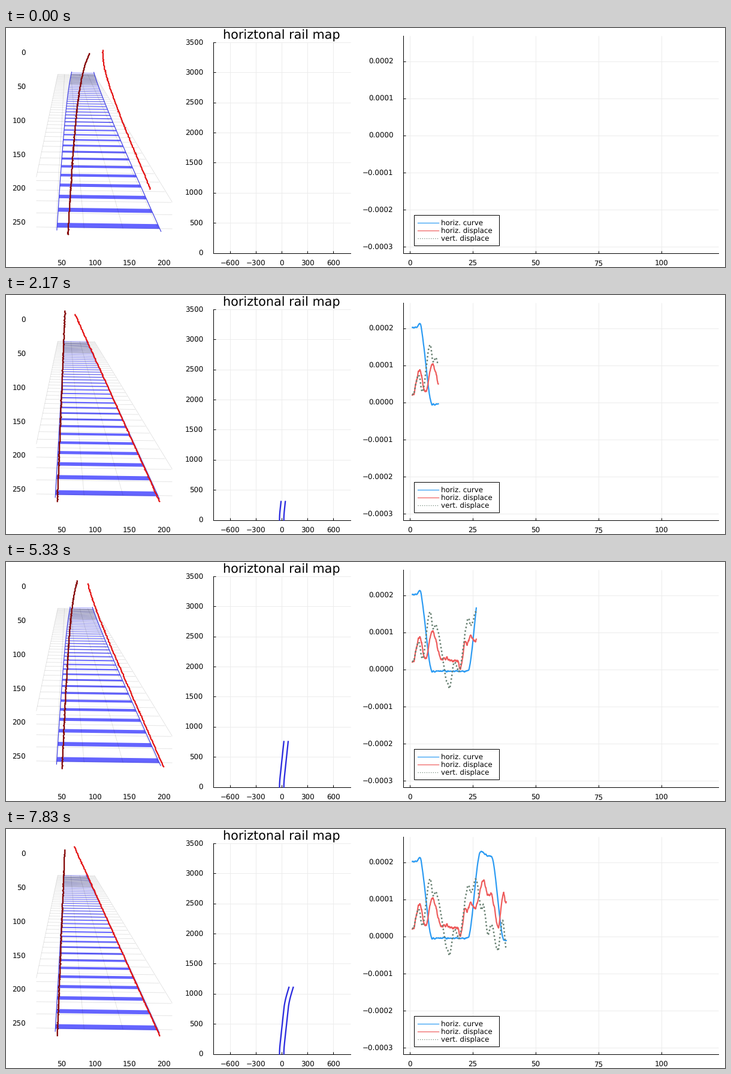
A matplotlib script for the animation above (8000 ms loop, 1200x400 px).

```python
import numpy as np
import matplotlib.pyplot as plt
from matplotlib.animation import FuncAnimation
from matplotlib.collections import LineCollection, PolyCollection
from matplotlib.patches import Rectangle

LOOP = 8000        # ms
TICK = 50          # ms per drawn frame
STEPS = 48         # visible picture changes in one loop
PX = 0.72          # points per pixel at 100 dpi
CELL = 1.137       # size of one camera pixel on the stage

plt.rcParams["text.hinting"] = "none"
fig = plt.figure(figsize=(12, 4), dpi=100, facecolor="white")
ax = fig.add_axes([0, 0, 1, 1])
ax.set_xlim(-0.5, 1199.5)
ax.set_ylim(399.5, -0.5)
ax.axis("off")


def line(xs, ys, color, width=1.0, z=2, **kw):
    return ax.plot(xs, ys, color=color, lw=width * PX, zorder=z, **kw)[0]


def strokes(segments, color, width=1.0, z=2):
    return ax.add_collection(LineCollection(
        segments, colors=[color], linewidths=width * PX, zorder=z))


def label(x, y, text, ha="center", size=11.9):
    ax.text(x, y, text, ha=ha, va="baseline", fontsize=size * PX,
            family="DejaVu Sans", color="black", zorder=10)


def panel(left, top, right, bottom, xticks, yticks, label_x):
    """Axes with grid, inward ticks and labels; ticks are (position, text)."""
    grid, marks = [], []
    for x, text in xticks:
        grid.append([(x, top), (x, bottom)])
        marks.append([(x, bottom), (x, bottom - 4)])
        label(x, 397, text)
    for y, text in yticks:
        grid.append([(left, y), (right, y)])
        marks.append([(left, y), (left + 4, y)])
        label(label_x, y + 4.5, text, ha="right")
    strokes(grid, "#ececec", z=1)
    strokes(marks, "black")
    line([left, left, right], [top, bottom, bottom], "black")


def signed(value, fmt):
    return format(value, fmt).replace("-", "\u2212")


def smooth(t, start, end):
    u = np.clip((t - start) / (end - start), 0, 1)
    return u * u * (3 - 2 * u)


def through(turns, t):
    """Eased curve through (t, value) turning points."""
    total = turns[0][1]
    for (t0, v0), (t1, v1) in zip(turns, turns[1:]):
        total = total + (v1 - v0) * smooth(t, t0, t1)
    return total


def chart_x(v):
    return 673.5 + 4.2 * v


def chart_y(v):
    """Stage height of a value given in 1e-4."""
    return 179.3 - 62.07 * v


# Labels, panels and legend
for v in range(0, 251, 50):
    label(32.5, 45.3 + CELL * v, str(v), ha="right")
for v in range(50, 201, 50):
    label(35.2 + CELL * v, 397, str(v))

panel(345.5, 23.5, 574, 376,
      [(459.75 + 0.143 * v, signed(v, "d")) for v in range(-600, 601, 300)],
      [(376 - 0.10071 * v, str(v)) for v in range(0, 3501, 500)], 328.5)
label(459.5, 18, "horiztonal rail map", size=20.8)

panel(662.5, 12, 1188, 376,
      [(chart_x(v), str(v)) for v in range(0, 101, 25)],
      [(chart_y(k), signed(k / 1e4, ".4f")) for k in range(-3, 3)], 646)

BLUE, RED, GREEN = "#2b9bf3", "#ee5c5c", "#667f70"
ax.add_patch(Rectangle((680.5, 312), 142, 51.5, fc="white", ec="black",
                       lw=PX, zorder=8))
legend = [(BLUE, "horiz. curve", "-"), (RED, "horiz. displace", "-"),
          (GREEN, "vert. displace", (0, (1, 2)))]
for k, (color, text, style) in enumerate(legend):
    y = 325 + 13.25 * k
    line([686, 721], [y, y], color, 1.2, z=9, ls=style)
    label(726, y + 4, text, ha="left")

# Ground grid in perspective
ground = []
for k in range(45):
    y = 1 + 1 / (0.003012 + 0.00023 * k)
    ends = max(50, 101.5 - 0.208 * (y - 2)), min(277, 101.5 + 0.607 * (y - 2))
    ground.append([(x, y + 0.0135 * (x - 90)) for x in ends])
for slope in (-0.208, -0.057, 0.085, 0.28, 0.456, 0.607):
    ys = np.linspace(77, 335, 400)
    xs = 101.5 + slope * (ys - 2)
    keep = (xs >= 50) & (xs <= 277)
    ground.append(np.column_stack([xs[keep], ys[keep]])[[0, -1]])
strokes(ground, (0, 0, 0, 0.13), 0.8, z=4)

# Chart data along the distance axis, values in 1e-4
dist = np.arange(1, 39, 0.1)
curve = through([(3.95, 2.02), (8.9, -0.05), (23, -0.05), (28.2, 2.29),
                 (31, 2.17), (32.3, 2.17), (37.5, -0.1)], dist)
curve += 0.12 * np.exp(-((dist - 4) / 0.8) ** 2)
horiz = through([(1, 0.21), (3.9, 0.87), (6.2, 0.27), (8.7, 1.04), (12.7, 0.28),
                 (19, 0.24), (20, 0), (22.2, 0.78), (22.8, 0.65), (24.2, 0.93),
                 (25.6, 0.75), (29.4, 1.5), (31.3, 1.08), (32.3, 1.15),
                 (35.1, 0.26), (37.2, 1.15), (38.3, 0.92)], dist)
vert = through([(1, 0.2), (3.7, 0.74), (4.9, 0.29), (8.1, 1.55), (9.4, 1.05),
                (10.1, 1.2), (15.8, -0.48), (17.7, 0.2), (19.4, -0.04),
                (23.3, 1.36), (24.2, 1.2), (26.3, 1.53), (28.5, 0.76),
                (29.2, 0.84), (31.1, 0.04), (32.4, 0.31), (34.9, -0.35),
                (36.9, 0.41), (38.3, -0.32)], dist)
rng = np.random.default_rng(4)


def ripple(size):
    noise = rng.normal(0, size, len(dist))
    return np.convolve(noise, np.ones(5) / 5, "same")


traces = [(curve + ripple(0.02), line([], [], BLUE, 2.2, z=5)),
          (horiz + ripple(0.06), line([], [], RED, 2.2, z=6)),
          (vert + ripple(0.04),
           line([], [], GREEN, 2.5, z=7, ls=(0, (1, 1.5))))]

# Rail map: curvature adds up to heading, heading to sideways position
heading = np.cumsum(curve) * 0.1 * 0.0098
map_x = 456 + np.cumsum(heading) * 0.1 * 2.99
map_y = 376 - 2.99 * (dist - 1)
map_rails = [line([], [], "#2c2cdf", 2.3, z=5) for _ in range(2)]

# Detected rails: (origin x, slope, line)
rails = [(99, -0.04, line([], [], "#850808", 2.3, z=6)),
         (101, 0.45, line([], [], "#e41414", 2.2, z=6))]

# Fitted track: sleepers and outline
SLOPES = (-0.057, 0.459)
sleepers = PolyCollection([], facecolors="#6464ff", edgecolors="none", zorder=3)
ax.add_collection(sleepers)
far_lines = strokes([], (0.1, 0.1, 0.1, 0.4), 0.7, z=4)
edges = [line([], [], "#4040e0", 1.2, z=4) for _ in range(2)]


def draw_track(bend, lift):
    def project(depth, slope):
        x = 101 + slope / depth + 72 * bend * depth
        return x, 1 + 1 / depth + 72 * lift * depth + 0.0135 * (x - 90)

    left, right = SLOPES
    depths = 0.003044 + 0.000261 * np.arange(42)
    half = 0.000037
    sleepers.set_verts([[project(d - half, left), project(d - half, right),
                         project(d + half, right), project(d + half, left)]
                        for d in depths])
    far_lines.set_segments([[project(d, s) for s in SLOPES]
                            for d in depths[30:40]])
    for edge, slope in zip(edges, SLOPES):
        edge.set_data(*project(np.linspace(0.00297, 0.0139, 80), slope))


def draw_rails(step, bend):
    noise = np.random.default_rng(100 + step)
    cuts = (0, 80 * bend ** 3)    # the outer rail is partly lost in curves
    for (origin, slope, artist), cut in zip(rails, cuts):
        top = 26 + 9 * bend + noise.uniform(0, 9)
        ys = np.arange(top, 346 - noise.uniform(0, 1) * cut, CELL)
        xs = origin + slope * (ys - 1) + bend * (13 + 1783 / (ys + 20))
        xs += noise.normal(0, 0.3, len(ys))
        artist.set_data(np.round(xs / CELL) * CELL, ys)


def draw(i):
    step = (TICK * (i + 1) - 1) * STEPS // LOOP
    end = 1 + 0.793 * step
    count = np.count_nonzero(dist <= end + 0.05) if step else 0
    for values, artist in traces:
        artist.set_data(chart_x(dist[:count]), chart_y(values[:count]))
    for k, artist in enumerate(map_rails):
        artist.set_data(map_x[:count] + 7.2 * k, map_y[:count])

    bend = (1 - smooth(step, 4, 10) + smooth(step, 29, 35.5)
            - smooth(step, 42, 46))
    draw_track(6 * np.interp(end, dist, curve), 3 * (1 - bend))
    draw_rails(step, bend)
    return []


anim = FuncAnimation(fig, draw, frames=LOOP // TICK, interval=TICK,
                     init_func=lambda: draw(0), repeat=True, repeat_delay=0)
plt.show()
```
